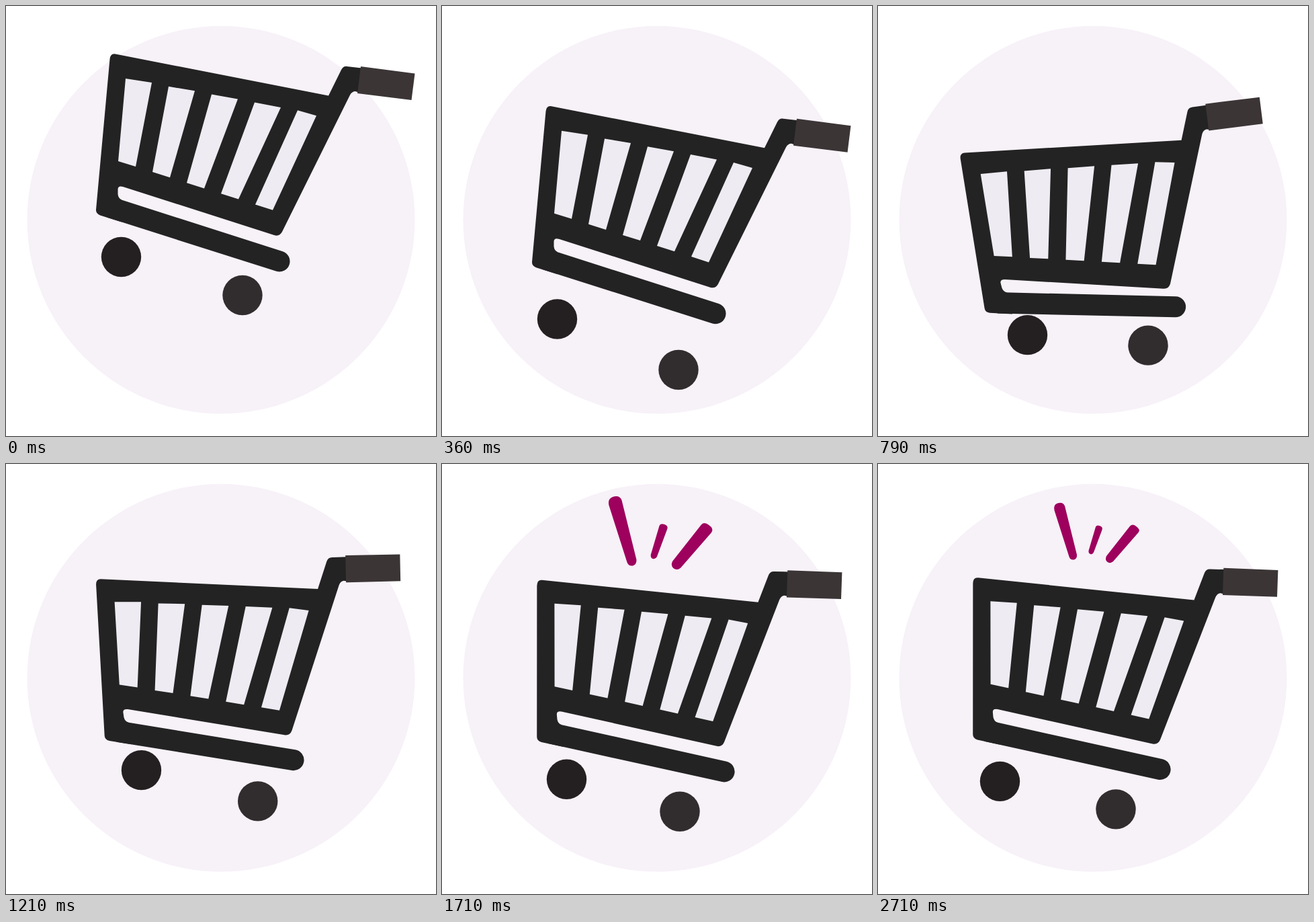
Write an HTML page that moves like this. It is 640x640 px and loops after 2780 ms.

```html
<!DOCTYPE html>
<html lang="en">
<head>
<meta charset="utf-8">
<title>Shopping cart</title>
<style>
  html, body { margin: 0; width: 100%; height: 100%; overflow: hidden; background: #fff; }
  svg { display: block; width: 100%; height: 100%; }
</style>
</head>
<body>
<svg viewBox="0 0 640 640">
  <circle cx="320" cy="318.3" r="288.5" fill="#f7f1f8"/>
  <g id="sparks" fill="#9e005d">
    <path d="M262.5 69Q260.5 61 267 58.5Q275.5 56 278 62.5L296 135Q296.5 141 291.5 142.5Q286 143 284.5 138Z"/>
    <path d="M324 93.5Q325.5 90.5 330 92Q335 93.5 333.5 98L321 131.5Q319 135 316 134Q313 133 313.5 129Z"/>
    <path d="M375 92.5Q379 88.5 384.5 93Q391 97.5 387.5 102L350 145Q345.5 149 341 145.5Q337.5 142 340 137Z"/>
  </g>
  <g id="cart">
    <g fill="#232323">
      <path id="rod" d="M168 287.3L411.7 365.2A15.5 15.5 0 0 1 402.3 394.8L150 314.6Z"/>
      <path d="M163 71.5L480 133.5L499 95Q502 89 508 90L530 92.5L526 129L520 127Q515 127 512 132.5
        L411 336Q407 343.5 399 341L174 269Q166.5 267 166.5 273V280Q167 286 172 288.5V321.5L140 311.5
        Q133.5 309 134 303L154.5 79Q155.5 70 163 71.5Z"/>
    </g>
    <path id="gaps" fill="#eeebf2"/>
    <path fill="#3b3536" d="M528 90L608.5 100.5L603.5 140L523 130Z"/>
  </g>
  <circle id="rear" r="29.7" fill="#242021"/>
  <circle id="front" r="29.7" fill="#312d2e"/>
</svg>
<script>
const LOOP = 2780, FRAMES = 39;
const { sin, cos, exp, min, max, floor, PI } = Math;
const $ = id => document.getElementById(id);

function ease(u) {
  u = max(0, min(1, u));
  return u * u * (3 - 2 * u);
}

// Ease from 0 to a peak value, then on to a resting value.
const swing = (n, from, top, end, peak, rest) =>
  peak * ease((n - from) / (top - from)) + (rest - peak) * ease((n - top) / (end - top));

// The cart drops, then bobs on a damped spring.
const REST = 311.7, HIT = 5;
const cartY = n => n < HIT
  ? REST - 77.7 * cos(PI * n / (2 * HIT))
  : REST + 63 * exp(-0.131 * (n - HIT)) * sin(2 * PI * (n - HIT) / 14);

const tilt = n => swing(n, HIT, 11, 21, -14.4, -5.2);

// Wheels fall a little ahead of the cart and are then swung along with it.
function wheel(id, n, x, y, lead, peak, rest) {
  const ahead = n < 8 ? lead * sin(PI * n / 8) : 0;
  $(id).setAttribute('cx', x + swing(n, HIT, 11, 22, peak[0], rest[0]));
  $(id).setAttribute('cy', cartY(n) + y + ahead + swing(n, HIT, 11, 18, peak[1], rest[1]));
}

// Five slanted gaps in the basket, the last one narrower.
let gaps = '';
for (let i = 0; i < 5; i++) {
  const w = i < 4 ? 39 : 28;
  const left = 178 + 64 * i, right = 193 + 51 * i;
  gaps += `M${left} ${108 + 11.8 * i}L${left + w} ${114 + 12.3 * i}`
        + `L${right} ${239 + 16.2 * i}L${right - 26} ${231 + 16.1 * i}Z`;
}
$('gaps').setAttribute('d', gaps);

// Steps last 70 ms, with one of 80 ms in every seven.
const start = n => 70 * n + 10 * floor((n + 3) / 7);

function stepAt(t) {
  let n = 0;
  while (n < FRAMES - 1 && start(n + 1) <= t) n++;
  return n;
}

function draw(t) {
  const n = stepAt(t % LOOP), a = tilt(n);
  $('cart').setAttribute('transform',
    `translate(371 ${cartY(n)}) rotate(${a}) translate(-371 -234)`);
  // The lower bar flexes when the tilt is strong.
  $('rod').setAttribute('transform', `rotate(${0.37 * min(0, a + 9)} 165 300)`);

  const back = ease((n - 24) / 7);
  wheel('rear', n, 171.5 - 4 * back, 139.5 + 6.5 * back, 16, [51, 26], [14, 14]);
  wheel('front', n, 352, 196.5, 36, [50, -15.5], [2, 5]);

  const pop = swing(n, 17, 24, 30, 1.22, 1);
  $('sparks').setAttribute('visibility', pop > 0 ? 'visible' : 'hidden');
  $('sparks').setAttribute('transform', `translate(326 102) scale(${pop}) translate(-326 -102)`);
}

const t0 = performance.now();
function tick() {
  draw(performance.now() - t0);
  requestAnimationFrame(tick);
}
tick();
</script>
</body>
</html>
```
